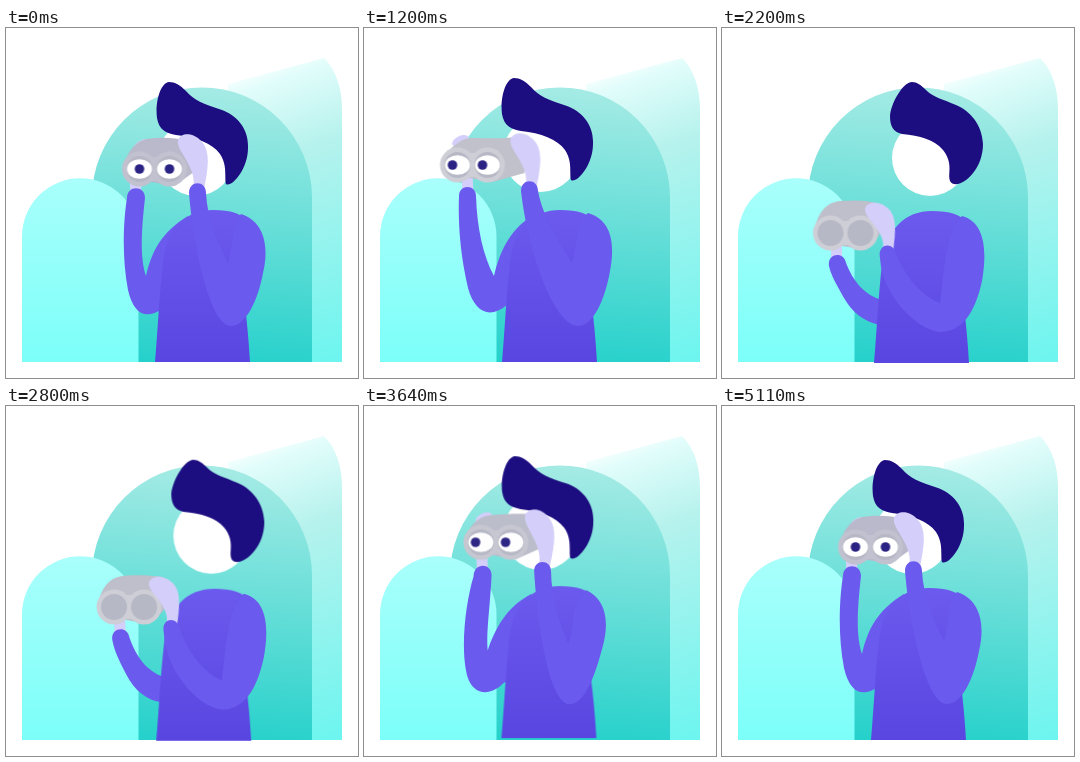
An HTML page without scripts that plays this animation: 352x350 px, repeating every 5.55 s.

```html
<!DOCTYPE html>
<html lang="en">
<head>
<meta charset="utf-8">
<title>Lookout</title>
<style>
html, body { margin: 0; width: 100%; height: 100%; overflow: hidden; background: #fff; }
svg { display: block; width: 100vw; height: 100vh; }

/* Every part shares one clock; poses: front, turning, left, leaving, lowered, lifting, right */
svg * { animation: 5.55s ease-in-out infinite; }
#torso { animation-name: torso; }
#head { animation-name: head; }
#hair { animation-name: hair; }
#glass { animation-name: glass; }
#tube { animation-name: tube; }
#rim { animation-name: rim; }
#farArm { animation-name: far-arm; }
#farHand { animation-name: far-hand; }
#nearArm { animation-name: near-arm; }
#nearHand { animation-name: near-hand; }
#eyes { animation-name: blink; }
#whites { animation-name: whites; }
#pupils { animation-name: pupils; }
#irises { animation-name: irises; }

@keyframes torso {
  0%, .54%, 92.07%, to { transform: none; animation-timing-function: ease-in; }
  11.35% { transform: translate(-8px, 0); animation-timing-function: ease-out; }
  18.02%, 27.57% { transform: translate(-11px, 0); animation-timing-function: ease-in; }
  29.37% { transform: translate(-5px, 0); animation-timing-function: ease-out; }
  39.64%, 45% { transform: translate(3px, 1px); animation-timing-function: ease-in; }
  58.38% { transform: translate(-5px, 0); animation-timing-function: ease-out; }
  67.39%, 80% { transform: translate(-12px, -2px); }
}
@keyframes head {
  0%, .54%, 92.07%, to { transform: none; animation-timing-function: ease-in; }
  11.35% { transform: translate(-9.5px, -3.5px); animation-timing-function: ease-out; }
  18.02%, 27.57% { transform: translate(-13px, -4px); animation-timing-function: ease-in; }
  29.37% { transform: translate(-6px, -3.5px); animation-timing-function: ease-out; }
  39.64%, 45% { transform: translate(18px, 0); animation-timing-function: ease-in; }
  58.38% { transform: translate(6px, -1px); animation-timing-function: ease-out; }
  67.39%, 80% { transform: translate(-14px, -4px); }
}
@keyframes hair {
  0%, 29.37%, 67.39%, to { d: path("M163 54C154 55 149 75 151 90C153 102 160 105 170 107C190 109 206 115 214 126C222 138 218 150 220 156C225 160 242 142 242 120C243 100 230 87 216 82C197 76 188 72 180 63C174 57 169 54 163 54Z"); }
  39.64%, 58.38% { d: path("M172 54C163 54 151 75 150 88C150 98 153 104 162 106C180 108 194 111 203 122C214 136 207 146 210 153C216 164 243 146 243 116C242 96 230 83 216 77C202 71 193 69 186 62C181 57 177 54 172 54Z"); }
}
@keyframes glass {
  0%, .54%, 92.07%, to { transform: translate(148.5px, 141px); animation-timing-function: ease-in; }
  11.35% { transform: translate(118.5px, 137px); animation-timing-function: ease-out; }
  18.02%, 27.57% { transform: translate(108.5px, 137px); animation-timing-function: ease-in; }
  29.37% { transform: translate(114px, 139.5px); animation-timing-function: ease-out; }
  39.64%, 45% { transform: translate(123.5px, 205px); animation-timing-function: ease-in; }
  58.38% { transform: translate(121.5px, 187px); animation-timing-function: ease-out; }
  67.39%, 80% { transform: translate(132.5px, 133px); }
}
@keyframes tube {
  0%, .54%, 92.07%, to { fill: #b9b9cb; d: path("M-30 -6C-25 -22 -16 -28 -8 -30C5 -32 20 -32 32 -28C40 -20 41 -5 38 4L20 17L-20 10Z"); animation-timing-function: ease-in; }
  11.35%, 18.02%, 29.37% { fill: #c0c1ca; d: path("M-30 -6C-22 -18 -12 -26 -2 -27C15 -27 28 -26 44 -28C54 -22 58 -5 52 8L20 17L-20 10Z"); }
  39.64%, 45% { fill: #bebfca; d: path("M-30 -8C-25 -25 -16 -31 -5 -32C10 -33 22 -33 30 -30C38 -24 40 -8 32 5L20 17L-20 10Z"); }
  58.38% { fill: #bebfca; d: path("M-30 -8C-26 -20 -18 -29 -5 -30C10 -31 24 -29 38 -30C48 -22 46 -5 36 4L20 17L-20 10Z"); }
  67.39%, 80% { fill: #bcbdca; d: path("M-30 -6C-24 -20 -15 -26 -5 -27C10 -29 25 -28 40 -29C50 -22 52 -5 46 6L20 17L-20 10Z"); }
}
@keyframes rim {
  0%, .54%, 92.07%, to { fill: #c1c1cf; }
  11.35%, 58.38% { fill: #cdced6; }
  67.39%, 80% { fill: #c5c6d1; }
}
@keyframes far-arm {
  0%, .54%, 92.07%, to { d: path("M121 170C121 157 139 157 139 170C135 205 134 230 140 248C146 222 156 204 182 188L190 260L156 281C141 291 128 288 122 262C116 230 117 195 121 170Z"); animation-timing-function: ease-in; }
  11.35% { d: path("M103 168C103 156 120 156 120 168C120 200 124 228 135 249C140 222 152 198 176 186L180 260L147 277C130 292 116 285 110 260C102 225 101 195 103 168Z"); animation-timing-function: ease-out; }
  18.02%, 27.57% { d: path("M95 168C95 156 112 156 112 168C113 200 119 228 130 248C136 222 148 198 172 186L176 260L143 277C126 291 111 285 104 260C96 225 94 195 95 168Z"); animation-timing-function: ease-in; }
  29.37% { d: path("M103 171C103 160 119 160 119 171C120 203 124 230 135 249C141 222 154 198 180 187L184 260L150 278C134 294 116 283 110 258C102 225 101 195 103 171Z"); animation-timing-function: ease-out; }
  39.64%, 45% { d: path("M107 238C105 225 122 223 124 235C131 253 142 267 160 272C161 262 162 250 164 240L190 260L158 297C142 294 130 284 122 270C114 256 109 247 107 238Z"); animation-timing-function: ease-in; }
  58.38% { d: path("M104 221C102 208 119 207 121 218C126 240 136 260 150 267C152 255 153 245 156 235L184 260L149 294C135 296 122 283 115 264C109 250 106 235 104 221Z"); animation-timing-function: ease-out; }
  67.39%, 80% { d: path("M110 167C110 153 128 153 128 166C126 200 121 225 122 243C130 220 142 198 168 185L175 260L139 276C126 290 109 290 103 272C95 245 101 195 110 167Z"); }
}
@keyframes far-hand {
  0%, .54%, 92.07%, to { transform: translate(130px, 168px); animation-timing-function: ease-in; }
  11.35% { transform: translate(112px, 167px); animation-timing-function: ease-out; }
  18.02%, 27.57% { transform: translate(104px, 167px); animation-timing-function: ease-in; }
  29.37% { transform: translate(111px, 171px); animation-timing-function: ease-out; }
  39.64%, 45% { transform: translate(115px, 235px); animation-timing-function: ease-in; }
  58.38% { transform: translate(112px, 218px); animation-timing-function: ease-out; }
  67.39%, 80% { transform: translate(119px, 166px); }
}
@keyframes near-arm {
  0%, .54%, 92.07%, to { d: path("M183 165C183 152 200 152 200 165C201 190 212 215 222 235C228 215 225 195 235 186C262 195 262 225 257 245C252 272 240 298 225 298C205 298 188 225 183 165Z"); animation-timing-function: ease-in; }
  11.35% { d: path("M164 163C164 150 181 150 181 163C185 190 200 215 212 235C218 215 215 195 228 185C254 193 253 222 249 243C244 272 232 298 217 298C195 297 170 225 164 163Z"); animation-timing-function: ease-out; }
  18.02%, 27.57% { d: path("M157 163C157 150 174 150 174 163C179 190 196 215 208 235C214 215 211 195 224 185C251 193 250 222 246 243C241 272 229 298 214 298C190 297 164 225 157 163Z"); animation-timing-function: ease-in; }
  29.37% { d: path("M164 167C162 154 179 154 181 166C185 190 202 215 215 235C221 215 219 195 231 186C257 194 256 224 252 245C247 274 235 299 219 299C197 297 171 225 164 167Z"); animation-timing-function: ease-out; }
  39.64%, 45% { d: path("M158 230C155 215 172 213 174 226C184 250 200 268 218 275C222 250 222 205 240 188C266 195 264 230 260 253C253 285 240 304 218 304C195 302 160 268 158 230Z"); animation-timing-function: ease-in; }
  58.38% { d: path("M157 213C154 199 171 199 172 211C178 240 192 262 208 272C212 245 212 205 230 187C257 192 255 222 250 247C244 278 231 302 210 302C182 298 158 255 157 213Z"); animation-timing-function: ease-out; }
  67.39%, 80% { d: path("M171 162C171 150 188 150 188 162C188 190 196 215 204 235C212 215 205 195 222 184C245 196 243 222 238 240C230 270 220 298 205 298C186 296 175 225 171 162Z"); }
}
@keyframes near-hand {
  0%, .54%, 92.07%, to { transform: translate(191px, 164px) rotate(0deg) scale(1); animation-timing-function: ease-in; }
  11.35% { transform: translate(172.5px, 162px) rotate(0deg) scale(1, .98); animation-timing-function: ease-out; }
  18.02%, 27.57% { transform: translate(165.5px, 162px) rotate(0deg) scale(1, .98); animation-timing-function: ease-in; }
  29.37% { transform: translate(172px, 166px) rotate(0deg) scale(1); animation-timing-function: ease-out; }
  39.64%, 45% { transform: translate(165px, 224px) rotate(-5deg) scale(.95, .87); animation-timing-function: ease-in; }
  58.38% { transform: translate(164px, 209px) rotate(-3deg) scale(1, .91); animation-timing-function: ease-out; }
  67.39%, 80% { transform: translate(179.5px, 161px) rotate(2deg) scale(1, 1.05); }
}
@keyframes blink {
  0%, 21.62%, 24.68%, 72.79%, 75.68%, to { transform: scaleY(1); }
  23.15%, 74.23% { transform: scaleY(.08); }
}
@keyframes whites {
  0%, 27.57%, 66%, to { opacity: 1; }
  29.37% { opacity: .25; }
  30.5%, 62% { opacity: 0; }
}
@keyframes irises {
  0%, 27.57%, 66%, to { opacity: 1; }
  29.37% { opacity: .65; }
  31.5%, 62% { opacity: 0; }
}
@keyframes pupils {
  0%, .54%, 92.07%, to { transform: none; }
  11.35% { transform: translate(-4.5px, 0); }
  18.02%, 27.57% { transform: translate(-5px, 0); }
  29.37%, 58.38% { transform: translate(-3px, 0); }
  67.39%, 80% { transform: translate(-5.5px, 0); }
}
</style>
</head>
<body>
<svg viewBox="0 0 352 350" preserveAspectRatio="none">
  <defs>
    <linearGradient id="pale" gradientUnits="userSpaceOnUse" x1="230" y1="50" x2="330" y2="330">
      <stop stop-color="#f6fffe"/>
      <stop offset=".05" stop-color="#e2fdfb"/>
      <stop offset=".3" stop-color="#b6f2ed"/>
      <stop offset="1" stop-color="#6ef5ef"/>
    </linearGradient>
    <linearGradient id="teal" gradientUnits="userSpaceOnUse" x1="215" y1="59" x2="195" y2="334">
      <stop stop-color="#a6ebe5"/>
      <stop offset="1" stop-color="#27d1cb"/>
    </linearGradient>
    <linearGradient id="aqua" x2="0" y2="1">
      <stop stop-color="#a9fffb"/>
      <stop offset="1" stop-color="#7cfff9"/>
    </linearGradient>
    <linearGradient id="cloth" gradientUnits="userSpaceOnUse" x1="0" y1="184" x2="0" y2="334">
      <stop stop-color="#6c5aee"/>
      <stop offset="1" stop-color="#5946e1"/>
    </linearGradient>
  </defs>

  <path fill="url(#pale)" d="M222 56L318 30C330 42 336 60 336 82V334H222Z"/>
  <path fill="url(#teal)" d="M86 334V169.500A110 110 0 0 1 306 169.500V334Z"/>
  <path fill="url(#aqua)" d="M16 334V208.500A58.250 58.250 0 0 1 132.500 208.500V334Z"/>

  <g id="head">
    <circle cx="190" cy="130" r="38" fill="#fff"/>
    <path id="hair" fill="#1c0d80"/>
  </g>

  <path id="farHand" d="M0 2L-1 -25" stroke="#d3cefa" stroke-width="11"/>
  <path id="farArm" fill="#6b5aee"/>
  <path id="torso" fill="url(#cloth)" d="M149 334C152 300 153 270 157 235C161 200 180 182 207 182C225 182 236 186 240 192L238 270Q242 300 244 334Z"/>

  <g id="glass">
    <ellipse cx="-12" cy="-24" rx="9" ry="5" fill="#d3cefa" transform="rotate(-25 -12 -24)"/>
    <path id="tube"/>
    <g id="rim">
      <circle cx="-15" r="17.500"/>
      <circle cx="15" r="17.500"/>
      <path d="M-8 -12H8V12H-8Z"/>
    </g>
    <g fill="#b7b8c5">
      <circle cx="-15" r="13"/>
      <circle cx="15" r="13"/>
    </g>
    <g id="eyes">
      <g id="whites" fill="#fff">
        <ellipse cx="-15" rx="12.500" ry="9.800"/>
        <ellipse cx="15" rx="12.500" ry="9.800"/>
      </g>
      <g id="pupils">
        <g id="irises" fill="#2b2383">
          <circle cx="-15" r="4.800"/>
          <circle cx="15" r="4.800"/>
        </g>
      </g>
    </g>
  </g>

  <path id="nearHand" fill="#d3cefa" d="M-19 -52C-16 -60 -3 -60 5 -50C14 -40 11 -22 6 2L-6 2C0 -12 -5 -22 -12 -34C-16 -41 -20 -46 -19 -52Z"/>
  <path id="nearArm" fill="#6b5aee"/>
</svg>
</body>
</html>
```
